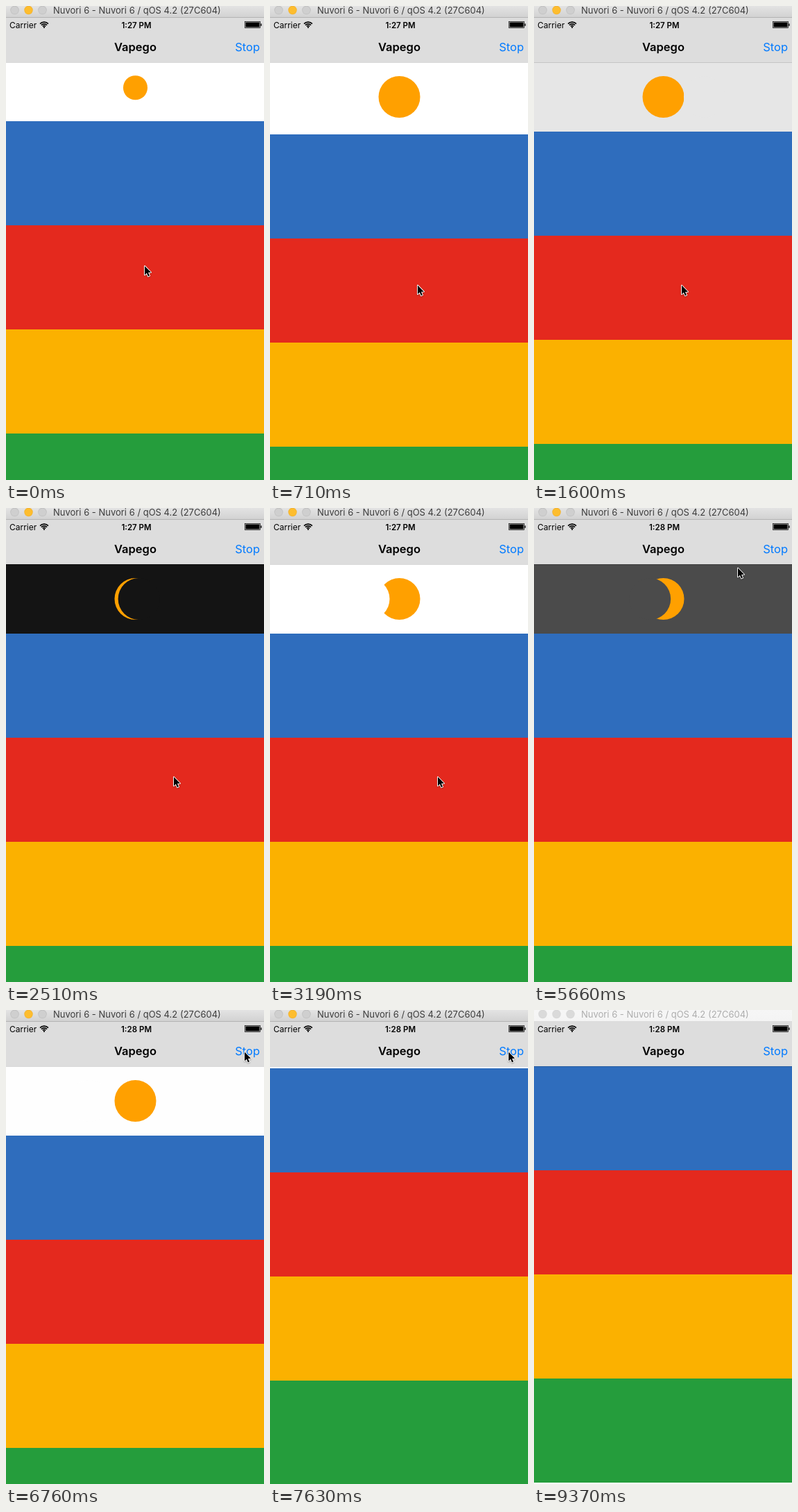
Recreate the animation shown at these times as an HTML page with a canvas. Size 372 px wide and 683 px high, loop 9470 ms.

```html
<!DOCTYPE html>
<html lang="en">
<head>
<meta charset="utf-8">
<title>Eclipse pull to refresh</title>
<style>
html, body { margin: 0; width: 100%; height: 100%; overflow: hidden; background: #fff; }
canvas { display: block; width: 372px; height: 683px; }
</style>
</head>
<body>
<canvas id="stage" width="372" height="683"></canvas>
<script>
const ctx = document.getElementById('stage').getContext('2d');
const W = 372, H = 683, LOOP = 9470;
const NAV_BOTTOM = 81, ROW = 150;
const ROW_COLORS = ['#2f6dbd', '#e4291e', '#fbb100', '#259d3c'];
const FONT = 'Inter, Roboto, sans-serif';
const SUN_X = 186.5, SUN_TOP = 101, SUN_SIZE = 60, MOON_TRAVEL = 66;
const FIRST_PASS = 1155, PASS = 2840;

// time, x, y of the pointer tip
const POINTER = [
  [0, 199, 373], [770, 212, 401], [1650, 212, 401], [2110, 241, 386],
  [5180, 241, 386], [5660, 293, 85], [6180, 341, 56], [6590, 343, 59],
  [8150, 343, 59], [8380, 315, 596], [8570, 315, 596], [8950, 332, 684], [LOOP, 332, 700]
];

const clamp = (v, lo = 0, hi = 1) => Math.min(hi, Math.max(lo, v));
const lerp = (a, b, k) => a + (b - a) * k;
const span = (t, from, to) => clamp((t - from) / (to - from));
const smooth = k => k * k * (3 - 2 * k);
const easeOut = k => 1 - (1 - k) ** 2;

// cubic-bezier(.42, 0, .58, 1)
function easeInOut(x) {
  let lo = 0, hi = 1;
  for (let i = 0; i < 20; i++) {
    const m = (lo + hi) / 2;
    if (1.26 * m - 0.78 * m * m + 0.52 * m ** 3 < x) lo = m; else hi = m;
  }
  return smooth(lo);
}

function pullOffset(t) {
  if (t < 1150) return lerp(85, 104, easeOut(span(t, 0, 770)));
  if (t < 7290) return lerp(104, 100, easeOut(span(t, 1150, 1480)));
  const rest = 100 * Math.exp(-(t - 7290) / 97);
  return rest < 0.3 ? 0 : rest;
}

// moon position from 1 (right) through 0 (total) to -1 (left)
function moonPhase(t) {
  const local = t - FIRST_PASS;
  if (local < 0 || local >= 2 * PASS) return 1;
  return 1 - 2 * easeInOut((local % PASS) / PASS);
}

function skyLevel(t, phase) {
  const cleared = t >= 3070 && t < FIRST_PASS + PASS;
  return cleared ? 255 : Math.round(255 * Math.abs(phase));
}

function pointerAt(t) {
  const i = Math.max(1, POINTER.findIndex(p => p[0] > t));
  const [t0, x0, y0] = POINTER[i - 1], [t1, x1, y1] = POINTER[i];
  const k = i === 1 ? easeOut(span(t, t0, t1)) : smooth(span(t, t0, t1));
  return [lerp(x0, x1, k), lerp(y0, y1, k)];
}

function rect(x, y, w, h, color) {
  ctx.fillStyle = color;
  ctx.fillRect(x, y, w, h);
}

function disc(x, y, r, color) {
  ctx.fillStyle = color;
  ctx.beginPath();
  ctx.arc(x, y, r, 0, Math.PI * 2);
  ctx.fill();
}

function label(text, x, y, size, weight, color, align = 'left') {
  ctx.font = `${weight} ${size}px ${FONT}`;
  ctx.textAlign = align;
  ctx.fillStyle = color;
  ctx.fillText(text, x, y);
}

function drawSky(t, offset) {
  const phase = moonPhase(t), level = skyLevel(t, phase);
  const sky = `rgb(${level},${level},${level})`;
  rect(0, NAV_BOTTOM, W, offset, sky);
  const r = clamp(SUN_SIZE + (offset - 100) * 5 / 3, 0, SUN_SIZE) / 2;
  if (r === 0) return;
  const top = lerp(SUN_TOP - 0.8, SUN_TOP, span(r, 17, 30));
  ctx.save();
  ctx.beginPath();
  ctx.rect(0, NAV_BOTTOM, W, offset);
  ctx.clip();
  disc(SUN_X, top + r, r, '#ffa000');
  disc(SUN_X + MOON_TRAVEL * phase, top + r, r, sky);
  ctx.restore();
}

function drawRows(offset) {
  ROW_COLORS.forEach((color, i) => {
    const top = Math.round(NAV_BOTTOM + offset + i * ROW);
    rect(0, top, W, ROW, color);
  });
}

function drawTitleBar(active) {
  const shade = ctx.createLinearGradient(0, 0, 0, 16);
  shade.addColorStop(0, active ? '#e3e3e3' : '#f6f6f6');
  shade.addColorStop(1, active ? '#d2d2d2' : '#f4f4f4');
  rect(0, 0, W, 16, shade);
  rect(0, 16, W, 1, active ? '#b4b4b4' : '#dcdcdc');
  [12.5, 32.5, 52.5].forEach((x, i) => {
    const lit = active && i === 1;
    disc(x, 6, 6.2, lit ? '#f0b030' : active ? '#bdbdbd' : '#d6d6d6');
    disc(x, 6, 5.5, lit ? '#fdbd2e' : active ? '#cfcfcf' : '#dadada');
  });
  label('Nuvori 6 - Nuvori 6 / qOS 4.2 (27C604)', 68, 11, 13, 400, active ? '#3c3c3c' : '#adadad');
}

function drawStatusBar(t) {
  label('Carrier', 5, 31.5, 12, 400, '#000');
  ctx.strokeStyle = '#000';
  ctx.lineWidth = 1.7;
  [3.6, 6.3, 9].forEach(r => {
    ctx.beginPath();
    ctx.arc(55, 31.6, r - 0.6, -Math.PI * 0.75, -Math.PI * 0.25);
    ctx.stroke();
  });
  disc(55, 30.8, 1.1, '#000');
  label(t < 3400 ? '1:27 PM' : '1:28 PM', 188, 31.5, 11.5, 600, '#000', 'center');
  ctx.lineWidth = 0.7;
  ctx.strokeRect(344.5, 22.5, 22, 9);
  rect(345.5, 23.5, 20, 7, '#000');
  rect(367.3, 25.4, 1.3, 3.4, '#000');
}

function drawNavBar(t) {
  rect(0, 17, W, NAV_BOTTOM - 17, '#dddddd');
  rect(0, NAV_BOTTOM, W, 0.6, 'rgba(0,0,0,.25)');
  label('Vapego', 186.5, 65.3, 16.5, 600, '#000', 'center');
  ctx.globalAlpha = t < 7220 ? 1 : t < 7300 ? 0.25 : lerp(0.25, 1, span(t, 7300, 7560));
  label('Stop', 366, 65, 16.5, 400, '#007aff', 'right');
  ctx.globalAlpha = 1;
}

function drawPointer(t) {
  const [x, y] = pointerAt(t);
  ctx.save();
  ctx.translate(x + 1, y + 1.6);
  ctx.beginPath();
  ctx.moveTo(0, 0);
  [[0, 12.8], [2.9, 10.1], [4.9, 14.9], [7, 14], [5, 9.3], [9, 9.2]]
    .forEach(([px, py]) => ctx.lineTo(px, py));
  ctx.closePath();
  ctx.lineJoin = 'round';
  ctx.lineWidth = 1.9;
  ctx.strokeStyle = '#fff';
  ctx.shadowColor = 'rgba(0,0,0,.3)';
  ctx.shadowBlur = 2;
  ctx.shadowOffsetY = 1;
  ctx.stroke();
  ctx.shadowColor = 'transparent';
  ctx.fillStyle = '#000';
  ctx.fill();
  ctx.restore();
}

function draw(t) {
  const offset = pullOffset(t);
  rect(0, 0, W, H, '#fff');
  drawSky(t, offset);
  drawRows(offset);
  drawNavBar(t);
  drawStatusBar(t);
  drawTitleBar(t < 9370);
  drawPointer(t);
}

const start = performance.now();
function tick() {
  draw((performance.now() - start) % LOOP);
  requestAnimationFrame(tick);
}
tick();
</script>
</body>
</html>
```
